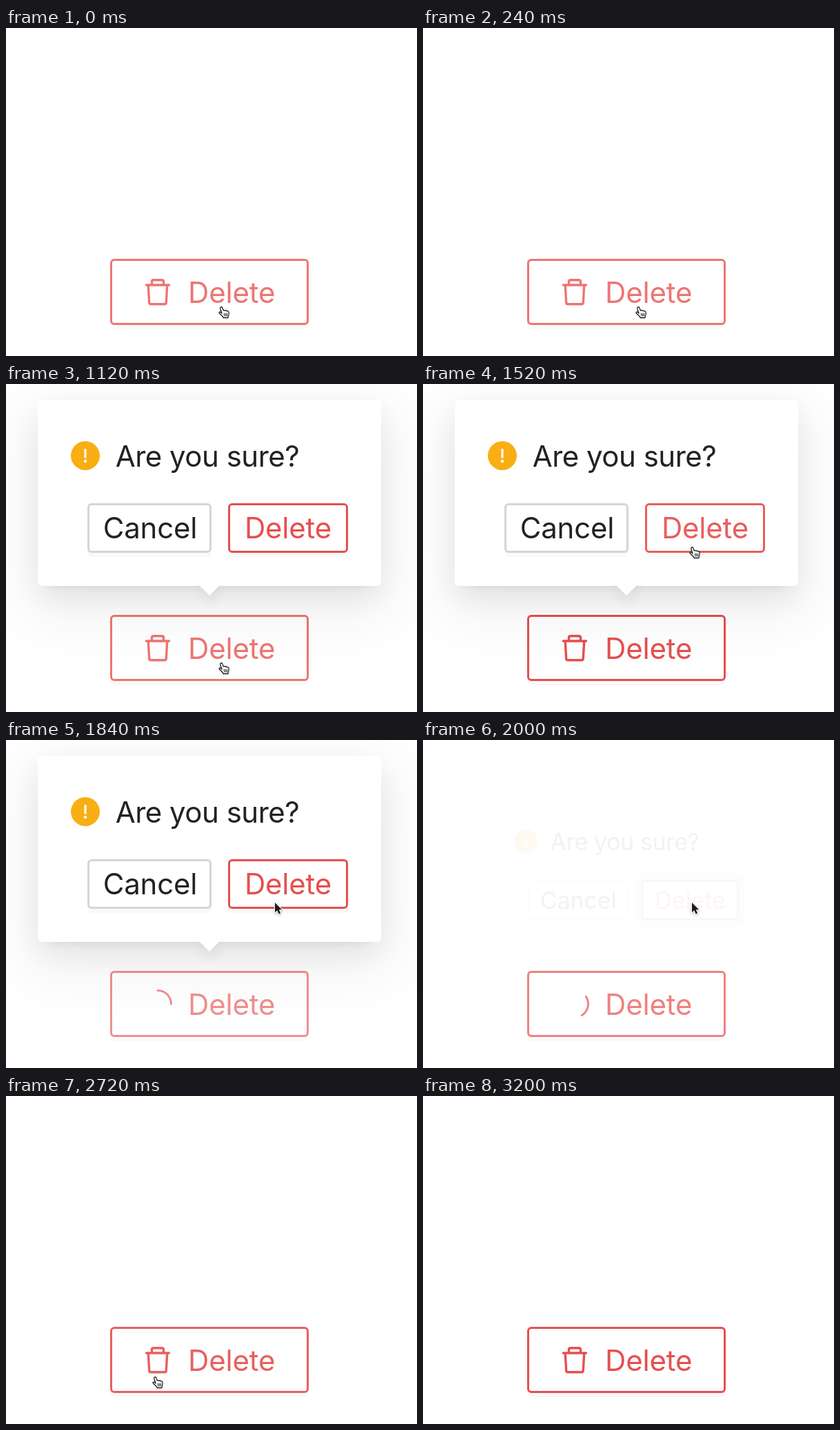
Recreate the animation shown at these times as an HTML page with a canvas. Size 596x476 px, loop 3360 ms.

```html
<!DOCTYPE html>
<html lang="en">
<head>
<meta charset="utf-8">
<title>Delete confirmation</title>
<style>
  html, body { margin: 0; width: 100%; height: 100%; overflow: hidden; background: #fff; }
  canvas { display: block; }
</style>
</head>
<body>
<canvas id="stage" width="596" height="476"></canvas>
<script>
const W = 596, H = 476, LOOP = 3360, STEP = 80;
const CLICK = 240, CONFIRM = 1840, DONE = 2600;
const stage = document.getElementById('stage').getContext('2d');
const layerCanvas = document.createElement('canvas');
layerCanvas.width = W;
layerCanvas.height = H;
const layer = layerCanvas.getContext('2d');

const RED = [229, 79, 78], HOVER = [237, 117, 114];
const BUTTON = [151, 335, 288, 96];
const CANCEL = [118, 173, 180, 72];
const OK = [322, 173, 174, 72];

const clamp = v => Math.min(1, Math.max(0, v));
const mix = (a, b, k) => a.map((v, i) => v + (b[i] - v) * k);
const rgb = c => `rgb(${c.map(Math.round).join(',')})`;
const inside = ([x, y], [l, t, w, h]) => x > l && x < l + w && y > t && y < t + h;

// Keys are [time, value array]; values run linearly between keys.
function track(keys, t) {
  let i = 0;
  while (i < keys.length - 2 && t >= keys[i + 1][0]) i++;
  const [t0, a] = keys[i], [t1, b] = keys[i + 1];
  return mix(a, b, clamp((t - t0) / (t1 - t0)));
}

function bezier(x1, y1, x2, y2) {
  const at = (a, b, u) => 3 * a * u * (1 - u) ** 2 + 3 * b * u * u * (1 - u) + u ** 3;
  return x => {
    let lo = 0, hi = 1;
    for (let i = 0; i < 24; i++) {
      const mid = (lo + hi) / 2;
      if (at(x1, x2, mid) < x) lo = mid; else hi = mid;
    }
    return at(y1, y2, (lo + hi) / 2);
  };
}
const easeOut = bezier(0.08, 0.82, 0.17, 1);
const easeInOut = bezier(0.78, 0.14, 0.15, 0.86);

const buttonColour = [
  [0, HOVER], [1280, HOVER], [1520, RED], [1839, RED],
  [1840, [241, 143, 141]], [2000, [238, 130, 128]], [2560, [238, 130, 128]],
  [2640, RED], [2720, [231, 96, 94]], [2800, [235, 108, 105]], [3040, RED], [LOOP, RED]
];

const pointerPath = [
  [0, [312, 404]], [1200, [312, 404]], [1360, [350, 320]], [1520, [390, 236]],
  [2320, [390, 236]], [2480, [330, 300]], [2640, [232, 388]], [2720, [216, 407]],
  [2800, [188, 437]], [2880, [141, 465]], [2960, [100, 500]], [LOOP, [100, 500]]
];

function box(c, [x, y, w, h], r) {
  c.beginPath();
  c.roundRect(x, y, w, h, r);
}

function text(c, str, cx, y, colour, gap = -0.2) {
  c.font = '400 42px Inter, "Open Sans", sans-serif';
  c.letterSpacing = gap + 'px';
  c.fillStyle = colour;
  const m = c.measureText(str);
  c.fillText(str, cx - (m.actualBoundingBoxRight - m.actualBoundingBoxLeft) / 2, y);
}

function frame(c, [x, y, w, h], colour) {
  c.fillStyle = 'rgba(0,0,0,0.025)';
  box(c, [x, y + 6, w, h], 6);
  c.fill();
  c.fillStyle = '#fff';
  box(c, [x, y, w, h], 6);
  c.fill();
  c.strokeStyle = colour;
  c.lineWidth = 3;
  box(c, [x + 1.5, y + 1.5, w - 3, h - 3], 4.5);
  c.stroke();
}

function ripple(c, [x, y, w, h], age, size, colour, strength) {
  if (age <= 0 || age >= 900) return;
  const s = size * easeOut(clamp(age / 400));
  c.fillStyle = `rgba(${colour},${strength * (1 - age / 900) ** 3})`;
  box(c, [x - s, y - s, w + 2 * s, h + 2 * s], 6 + s);
  c.fill();
}

function trash(c, colour) {
  c.strokeStyle = colour;
  c.lineWidth = 3.4;
  c.lineCap = c.lineJoin = 'round';
  c.stroke(new Path2D('M203.5 373H236.5M211.5 372V368Q211.5 365.7 214 365.7H226Q228.5 365.7 228.5 368V372' +
    'M206.3 374L207.7 398.5Q207.9 400.7 210 400.7H230Q232.1 400.7 232.3 398.5L233.7 374'));
}

function spinner(c, age, colour) {
  const a = -Math.PI / 2 + age / 1000 * 2 * Math.PI;
  c.strokeStyle = colour;
  c.lineWidth = 3;
  c.lineCap = 'round';
  c.beginPath();
  c.arc(220, 383, 19.5, a, a + Math.PI / 2);
  c.stroke();
}

function mainButton(t) {
  const colour = rgb(track(buttonColour, t));
  ripple(stage, BUTTON, t - CLICK, 15, '128,100,100', 0.15);
  frame(stage, BUTTON, colour);
  if (t >= CONFIRM && t < DONE) spinner(stage, t - CONFIRM, colour);
  else trash(stage, colour);
  text(stage, 'Delete', 328, 398.5, colour);
}

// Paints only the shadow of a panel; the panel itself lies off the stage.
function panelShadow(c, s, dy, blur, spread, alpha) {
  const far = 2000;
  c.save();
  c.shadowColor = `rgba(0,0,0,${alpha})`;
  c.shadowBlur = blur * s;
  c.shadowOffsetX = far * s;
  c.shadowOffsetY = dy * s;
  c.fillStyle = '#000';
  box(c, [46 - far - spread, 23 - spread, 498 + 2 * spread, 270 + 2 * spread], 6 + Math.max(0, spread));
  c.fill();
  c.restore();
}

function popup(t) {
  const opening = easeOut(clamp((t - CLICK) / 200));
  const closing = easeInOut(clamp((t - CONFIRM) / 200));
  const show = t < CONFIRM ? opening : 1 - closing;
  if (t <= CLICK || show < 0.002) return;
  const s = 0.8 + 0.2 * show, c = layer;

  c.setTransform(1, 0, 0, 1, 0, 0);
  c.clearRect(0, 0, W, H);
  c.setTransform(s, 0, 0, s, 295 * (1 - s), 331 * (1 - s));

  panelShadow(c, s, 27, 84, 24, 0.05);
  panelShadow(c, s, 18, 48, 0, 0.08);
  panelShadow(c, s, 9, 18, -12, 0.12);
  c.fillStyle = '#fff';
  box(c, [46, 23, 498, 270], 6);
  c.fill();

  c.save();
  c.shadowColor = 'rgba(0,0,0,0.07)';
  c.shadowBlur = 21 * s;
  c.shadowOffsetY = 12.7 * s;
  c.fill(new Path2D('M295 271L313 289L295 307L277 289Z'));
  c.restore();

  c.fillStyle = '#f9ae14';
  c.beginPath();
  c.arc(115, 104, 21, 0, 7);
  c.fill();
  c.fillStyle = '#fff';
  box(c, [113.4, 94, 3.2, 13.5], 1);
  c.fill();
  c.beginPath();
  c.arc(115, 112, 2.2, 0, 7);
  c.fill();

  text(c, 'Are you sure?', 292, 119.5, '#222', -0.5);
  frame(c, CANCEL, '#d5d5d5');
  text(c, 'Cancel', 208.5, 224.3, '#222');

  const over = clamp((t - 1440) / 200) * clamp((CONFIRM - t) / 120);
  const colour = rgb(mix(RED, HOVER, over));
  ripple(c, OK, t - CONFIRM, 13, '200,120,120', 0.3);
  frame(c, OK, colour);
  text(c, 'Delete', 409.8, 224.3, colour);

  stage.globalAlpha = show;
  stage.drawImage(layerCanvas, 0, 0);
  stage.globalAlpha = 1;
}

const HAND = new Path2D('M5 10L3 4Q2.3 1.2 3.9 .8Q5.4 .5 6 2.4L7.3 6Q9 5 10 6.3Q11.6 5.4 12.5 6.9' +
  'Q14.6 6.4 15 8.6Q15.6 11 14.6 13L14 16.5H7L6.4 14.8Q3.5 12 1.2 9.8Q.6 8 2.6 8Q3.6 8.4 5 10Z');
const FINGERS = new Path2D('M8.3 10.2L8.8 14M10.4 10.2L10.7 14M12.5 10.2V14');
const ARROW = new Path2D('M0 0V14.2L3.3 11.2L5.6 16.6L8.2 15.5L5.9 10.3H10.2Z');

function cursor(t) {
  const p = track(pointerPath, t), c = stage;
  const busy = t >= CONFIRM && t < DONE;
  const hand = !busy && (inside(p, BUTTON) || (t < CONFIRM && inside(p, OK)));
  c.save();
  c.lineJoin = c.lineCap = 'round';
  c.translate(p[0] - (hand ? 4 : 0), p[1]);
  if (hand) {
    c.fillStyle = '#fff';
    c.strokeStyle = '#1c1c1c';
    c.lineWidth = 1.3;
    c.fill(HAND);
    c.stroke(HAND);
    c.lineWidth = 1;
    c.stroke(FINGERS);
  } else {
    c.shadowColor = 'rgba(0,0,0,0.3)';
    c.shadowBlur = 3;
    c.shadowOffsetY = 1;
    c.strokeStyle = '#fff';
    c.lineWidth = 2.4;
    c.stroke(ARROW);
    c.shadowColor = 'transparent';
    c.fillStyle = '#1c1c1c';
    c.fill(ARROW);
  }
  c.restore();
}

function draw(t) {
  stage.fillStyle = '#fff';
  stage.fillRect(0, 0, W, H);
  mainButton(t);
  popup(t);
  cursor(t);
}

const start = performance.now();
function tick() {
  const t = (performance.now() - start) % LOOP;
  draw(Math.min(3200, Math.floor(t / STEP) * STEP));
  requestAnimationFrame(tick);
}
tick();
</script>
</body>
</html>
```
